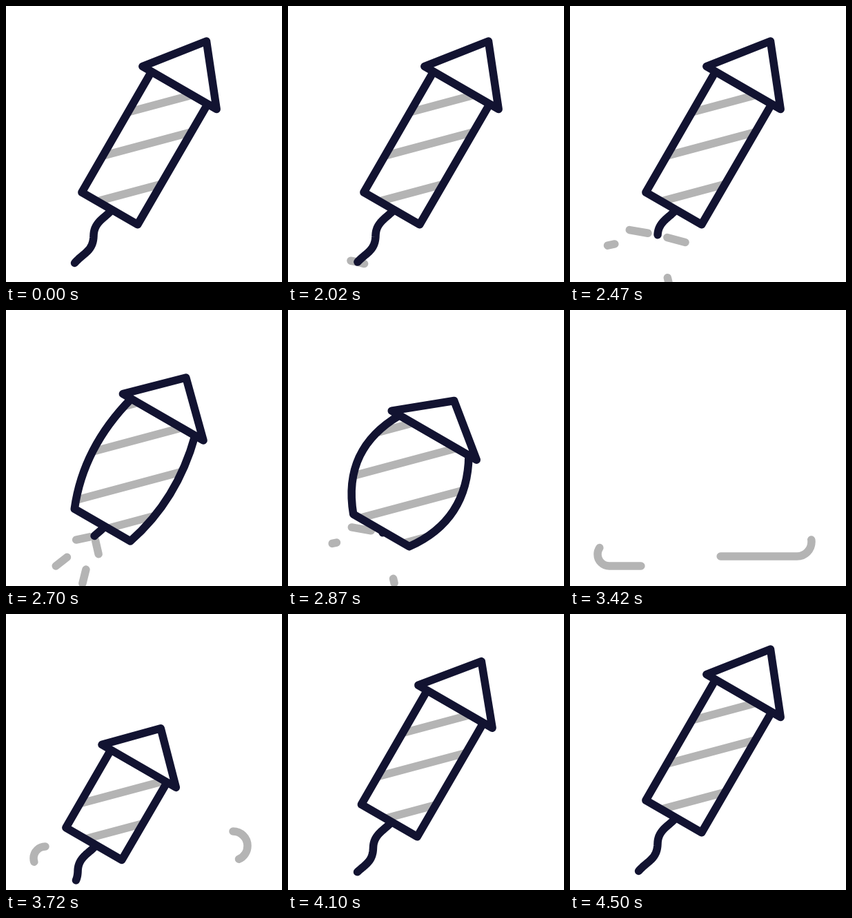
Animation of 400x400 px, one loop 4.52 s. Source, as an HTML page with a canvas:

```html
<!DOCTYPE html>
<html lang="en">
<head>
<meta charset="utf-8">
<style>
  html, body { margin: 0; width: 100%; height: 100%; overflow: hidden; background: #fff; }
  canvas { display: block; width: 100vmin; height: 100vmin; }
</style>
</head>
<body>
<canvas id="stage"></canvas>
<script>
const LOOP = 4520, INK = '#121331', GREY = '#b4b4b4', WEIGHT = 11.5;
const canvas = document.getElementById('stage');
const ctx = canvas.getContext('2d');
const clamp = x => Math.max(0, Math.min(1, x));
const span = (t, from, to) => clamp((t - from) / (to - from));
const easeOut = x => 1 - (1 - x) ** 2;
const smooth = x => x * x * (3 - 2 * x);
const mix = (a, b, p) => a + (b - a) * p;

// Fuse as points relative to the middle of the rocket's base
const bezier = (a, b, c, d, u) => [0, 1].map(i =>
  a[i] * (1 - u) ** 3 + 3 * b[i] * u * (1 - u) ** 2 + 3 * c[i] * u * u * (1 - u) + d[i] * u ** 3);
const knee = [-23.5, 39];
const fusePoint = u => u < .47
  ? bezier([2, 3], [-8, 14], [-23, 20], knee, u / .47)
  : bezier(knee, [-24, 62], [-38, 64], [-51, 79], (u - .47) / .53);

const SPARK_ANGLES = [[190, 15], [142, 104], [168, 77]];
const SPARK_START = 2005, SPARK_GAP = 130, SPARK_LIFE = 230, FUSE_END = 2874;

function line(points, close) {
  ctx.beginPath();
  points.forEach(([x, y]) => ctx.lineTo(x, y));
  if (close) ctx.closePath();
}

function stroke(color) {
  ctx.strokeStyle = color;
  ctx.stroke();
}

function fillAndStroke() {
  ctx.fillStyle = '#fff';
  ctx.fill();
  stroke(INK);
}

// base, head and stripes are distances moved back along the flight axis; sway is sideways
function pose(t) {
  if (t < 3450) {
    const squash = smooth(1 - (1 - span(t, 2490, 3100)) ** 1.75);
    const p = squash * (1 - smooth(span(t, 3110, 3230)));
    const launch = 520 * span(t, 3130, 3400) ** 2;
    return {
      base: 32 * p ** .67 - launch,
      head: 81.5 * p - launch,
      stripes: 182 * squash ** .44 - launch,
      sway: -3 * Math.sqrt(p),
      headHeight: mix(78, 56, p),
      headWidth: mix(62, 72, p),
      topWidth: mix(47, 59, p),
      bulge: mix(47, 92, p ** 1.15),
      fuse: 1 - span(t, SPARK_START, FUSE_END)
    };
  }
  const p = (Math.max(0, 4500 - t) / 780) ** 2.8;
  const enter = 150 * (1 - span(t, 3450, 3640)) ** 2;
  return {
    base: 46 * p + enter,
    head: 118 * p + enter,
    stripes: 140 * p + enter,
    sway: 0,
    headHeight: 78 - 15 * p,
    headWidth: 62, topWidth: 47, bulge: 47,
    fuse: 1 - .4 * p
  };
}

function drawSparks(t, [x, y]) {
  for (let k = 0, born = SPARK_START; born < FUSE_END - 60; born = SPARK_START + ++k * SPARK_GAP) {
    const age = (t - born) / SPARK_LIFE;
    if (age <= 0 || age >= 1) continue;
    const front = 75 * easeOut(age), back = 75 * age ** 1.5;
    for (const degrees of SPARK_ANGLES[k % 3]) {
      const a = degrees * Math.PI / 180;
      line([back, front].map(r => [x + r * Math.cos(a), y + r * Math.sin(a)]));
      stroke(GREY);
    }
  }
}

// Smoke runs along the ground and curls up at its end
function drawSmoke(t, startX, x, y, r) {
  const length = Math.abs(x - startX) + Math.PI * r;
  const front = length * easeOut(span(t, 3180, 3560));
  const back = length * span(t, 3300, 3865);
  if (front <= back) return;
  ctx.beginPath();
  ctx.moveTo(startX, y + r);
  ctx.arc(x, y, r, Math.PI / 2, -Math.PI / 2, x > startX);
  ctx.setLineDash([front - back, 999]);
  ctx.lineDashOffset = -back;
  stroke(GREY);
  ctx.setLineDash([]);
}

function drawRocket(t) {
  const s = pose(t);
  ctx.save();
  ctx.translate(150.5 - .5 * s.base, 293.5 + .866 * s.base);
  drawSparks(t, fusePoint(s.fuse));
  if (s.fuse > 0) {
    line(Array.from({ length: 41 }, (_, i) => fusePoint(s.fuse * i / 40)));
    stroke(INK);
  }
  ctx.restore();

  ctx.save();
  ctx.translate(150.5, 293.5);
  ctx.rotate(Math.PI / 6);
  const { sway, bulge, topWidth, headWidth } = s;
  const top = s.head - 202;
  const low = mix(s.base, top, 1 / 3), high = mix(s.base, top, 2 / 3);
  const body = new Path2D();
  body.moveTo(sway - topWidth, top);
  body.bezierCurveTo(sway - bulge, high, sway - bulge, low, -47, s.base);
  body.lineTo(46.5, s.base);
  body.bezierCurveTo(sway + bulge, low, sway + bulge, high, sway + topWidth, top);
  body.closePath();
  ctx.fillStyle = '#fff';
  ctx.fill(body);
  ctx.save();
  ctx.clip(body);
  for (let n = -4; n < 2; n++) {
    for (const offset of [-108, -21]) {
      const c = offset + n * 160 + s.stripes;
      line([[-120, c + 120], [120, c - 120]]);
      stroke(GREY);
    }
  }
  ctx.restore();
  ctx.strokeStyle = INK;
  ctx.stroke(body);
  line([[sway - headWidth, top], [sway, top - s.headHeight], [sway + headWidth, top]], true);
  fillAndStroke();
  ctx.restore();
}

function frame(now) {
  const t = now % LOOP;
  const size = Math.round(Math.min(innerWidth, innerHeight) * devicePixelRatio);
  if (canvas.width !== size) canvas.width = canvas.height = size;
  ctx.setTransform(size / 400, 0, 0, size / 400, 0, 0);
  ctx.clearRect(0, 0, 400, 400);
  ctx.lineWidth = WEIGHT;
  ctx.lineCap = ctx.lineJoin = 'round';
  drawSmoke(t, 130, 57, 354, 17);
  drawSmoke(t, 170, 329, 336, 21);
  drawRocket(t);
  requestAnimationFrame(frame);
}
requestAnimationFrame(frame);
</script>
</body>
</html>
```
